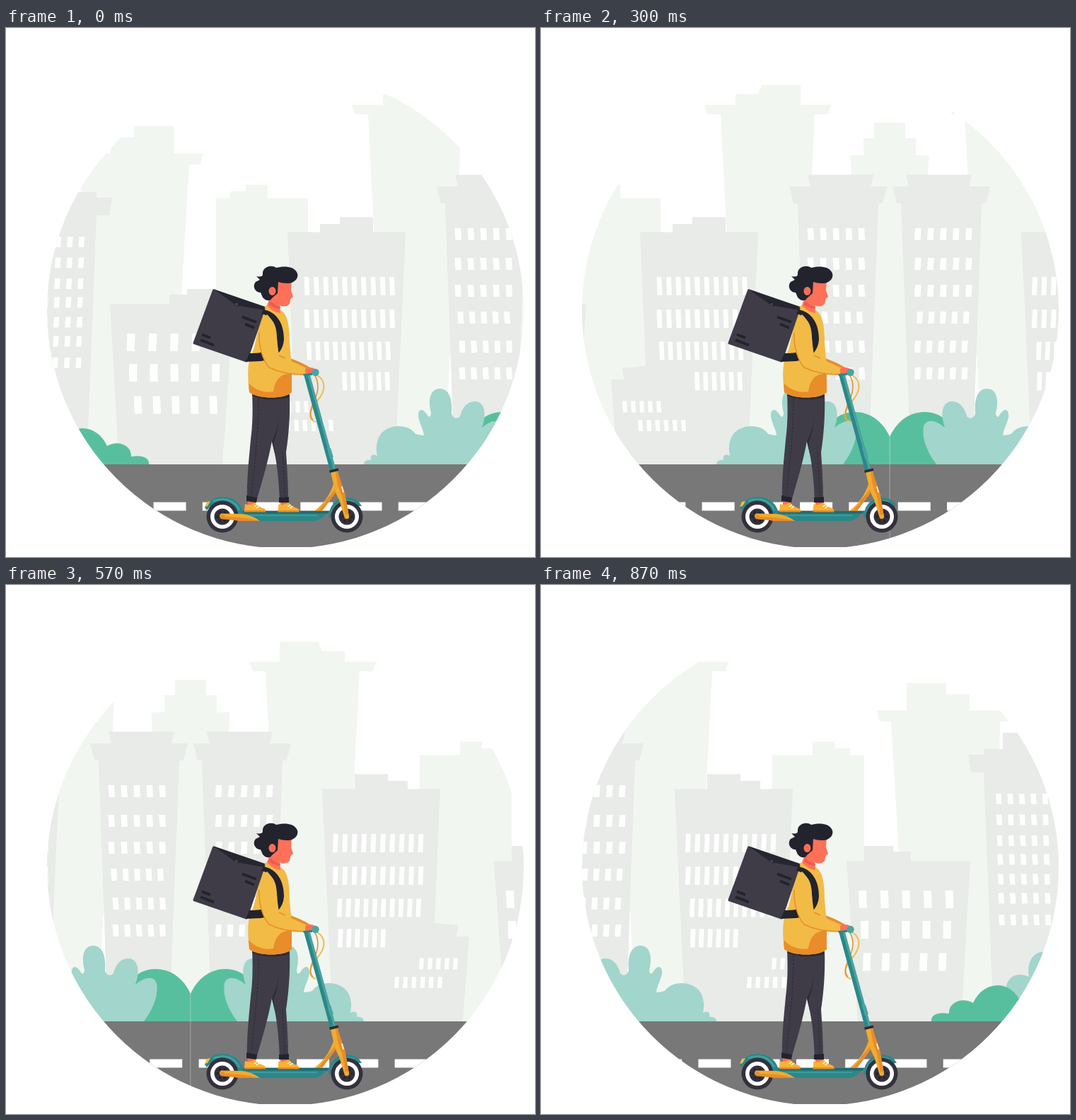
These frames come from a looping animation (748 by 748 pixels, 0.9 s). An HTML page:

```html
<!DOCTYPE html>
<html lang="en">
<head>
<meta charset="utf-8">
<title>Scooter courier</title>
<style>
  html, body { margin: 0; width: 100%; height: 100%; overflow: hidden; background: #fff; }
  svg { display: block; width: 100vw; height: 100vh; }
</style>
</head>
<body>
<svg viewBox="0 0 748 748">
  <defs>
    <clipPath id="disc"><circle cx="395" cy="399" r="337"/></clipPath>
    <g id="street">
      <g fill="#f1f6f1">
        <path d="M0 134H22V156H37.500L36.500 180H55.500L53 224V617H0Z"/>
        <path d="M126 80.500H181L186 93.500H218V108.500H262L258 122H239L214 617H131L106 122H88L83 108.500H126Z"/>
        <path d="M324 240.500H381V221.500H412V231H434V240.500H454V617H324Z"/>
        <path d="M472 177.500H514V138.500H570V154.500H603V177.500H666L662 193H646L640 617H517L492 193H476Z"/>
      </g>
      <g fill="#e8ebe8">
        <path d="M23 207.500H116L112 224H142L136 248H130L117 617H30L16 248H10L4 224H27Z"/>
        <path d="M186 288.500H232V267.500H279V277H307V288.500H353L345 478L378 481L376 497H394L385 617H201Z"/>
        <path d="M429 390.500H454V369H495V377H520V390.500H604L591 617H445Z"/>
        <path d="M601 240H623V232H650V209H748V617H637L623 265H605Z"/>
      </g>
      <path id="panes" fill="#fff"/>
      <g fill="#a2d5cb">
        <path d="M655 617V567C658 552 673 547 687 554C683 532 695 519 705 519C718 520 720 535 716 550L735 617Z"/>
        <path fill="#58bf9e" d="M549 617C548 609 556 603 574 606C573 590 593 582 608 591C616 574 629 566 643 566C657 566 668 575 676 590L690 617Z"/>
        <path fill="#58bf9e" d="M0 578C10 556 28 543 49 543C66 543 76 550 82 558V617H0Z"/>
        <path d="M66 617C53 600 46 582 47.500 566C49 552 64 553 78 565C71 546 74 528 88 528C99 528 106 537 109 549C113 554 119 552 121 545C119 522 126 510 138 510C151 510 155 526 150 544C150 550 153 552 156 546C163 536 169 539 168 550C166 560 161 567 160 576Q165 576 172 574C182 559 212 559 223 577C228 587 228 596 226 605C231 602 237 603 235 611C240 610 245 612 245 617Z"/>
      </g>
      <rect y="617" width="750" height="118" fill="#787878"/>
      <path id="dashes" fill="#fff"/>
    </g>
  </defs>

  <rect width="748" height="748" fill="#fff"/>
  <g clip-path="url(#disc)">
    <g id="world">
      <use href="#street"/>
      <use href="#street" transform="scale(-1 1)"/>
      <path d="M0 578V735" stroke="#fff" stroke-opacity=".28"/>
    </g>
  </g>
  <rect y="734" width="748" height="14" fill="#fff"/>

  <!-- scooter -->
  <g id="scooter">
    <path fill="none" stroke="#f2bb46" stroke-width="2" d="M440 491C453 499 452 513 441 526C428 541 426 553 438 557"/>
    <path fill="none" stroke="#e88d29" stroke-width="1.500" d="M437 492C444 504 441 516 436 527C430 539 429 549 434 554"/>
    <path fill="#2a8889" d="M421 490L429 488L466 623L458 625Z"/>
    <path fill="#4ba3a3" d="M426 489L429 488L466 623L463 624Z"/>
    <path fill="#4ba3a3" d="M454 594L459 594L463 607L458 609Z"/>
    <path fill="#2a8889" d="M329 683.500H456L449 691Q443 697 432 697H340Z"/>
    <path fill="#1f6c72" d="M328 683H457L455 686.500H329Z"/>
    <path fill="#4ba3a3" d="M345 688.500H440V689.700H345Z"/>
    <path fill="#2a8889" d="M281 678C286 667 297 663 306 663C322 663 333 672 336 686L328 691C325 679 317 671 306 671C296 671 290 674 284 682Z"/>
    <path fill="none" stroke="#4ba3a3" stroke-width="2" d="M293 669C310 662 324 669 330 682"/>
    <path fill="#f2bb46" d="M281 677L284 670L289 669L285 676Z"/>
    <path fill="#2a8889" d="M456 692C457 674 468 664 482 664C491 664 499 668 503 676L497 676C484 667 468 673 464 692Z"/>
    <path fill="none" stroke="#4ba3a3" stroke-width="1.500" d="M460 684C465 672 478 665 492 670"/>
    <g id="wheels"></g>
    <path fill="#f2ab2e" d="M304 686.500L332 687C344 688 352 692 359 697H333L304 694Q300 690 304 686.500Z"/>
    <path fill="#e88d29" d="M304 694Q302 691 306 691L330 692Q345 693 359 697H333Z"/>
    <path fill="#e88d29" d="M466 645L470 652L447 683H436C450 675 460 662 466 645Z"/>
    <path fill="#f2ab2e" d="M466 641L466 651L443 681L436 683C449 673 458 660 463 645Z"/>
    <path fill="#f2ab2e" d="M459 628L469 626C472 642 479 652 480 663L485 690Q484 696 479 693L471 667C464 655 463 643 459 628Z"/>
    <path fill="#e88d29" d="M466 627L469 626C472 642 479 652 480 663L485 690L481 694L475 662C469 650 468 640 466 627Z"/>
    <circle cx="482" cy="691" r="3" fill="#f2ab2e"/>
    <path stroke="#fff" stroke-width="1.500" stroke-linecap="round" d="M475 649L477 656"/>
    <path fill="#2b2a35" d="M457 625.500L469.500 622.500L470.500 626L458 629Z"/>
    <circle cx="306" cy="691" r="3" fill="#e88d29"/>
  </g>

  <!-- rider -->
  <g id="rider">
    <path fill="#ff7058" d="M342 667H353V675H342ZM388 667H399V675H388Z"/>
    <g id="shoe">
      <path fill="#f9b233" d="M338 673Q345 676 352 671Q357 677 364 679Q367 680 367 683H337Z"/>
      <path fill="#e88d29" d="M337 682H367V684.500H337Z"/>
      <path stroke="#fff" stroke-width="1.200" d="M351 677L355 674M354 679L358 676"/>
    </g>
    <use href="#shoe" x="47.500"/>
    <path fill="#3f3c48" d="M348 514L401 518C402 545 400 575 396 600C398 630 399 650 399 669L387 670C386 640 383 610 376 584C371 612 362 642 354 669L341 666C340 640 344 605 346 582C349 560 349 540 348 514Z"/>
    <path fill="#2b2a35" d="M349 514L400 518V522C380 528 360 525 348 520ZM389 527C386 545 388 560 376 585C378 593 380 601 381 606C379 592 378 586 379 584C387 565 386 545 389 527Z"/>
    <path fill="none" stroke="#2b2a35" stroke-dasharray="3 2" d="M357 524C358 560 352 610 347 660M391 600C392 620 394 645 394 662"/>
    <path fill="#24242e" d="M340 661L355 664L354 671L340 669ZM386 664L400 663V671H386Z"/>

    <path fill="#e88d29" d="M396 465Q415 471 430 480L426 486L398 476Z"/>
    <path fill="#f2bb46" d="M366 393C375 392 384 396 391 401C399 408 401 425 401 445L404 478V515C395 525 356 525 344 515C341 490 341 470 350 455C354 440 358 415 366 393Z"/>
    <path fill="#e88d29" d="M404 489C388 487 380 499 378 514C363 517 351 510 343 502L344 515C356 525 395 525 404 515Z"/>
    <path fill="#ff7058" d="M373 382L387 389L388 403C380 402 374 398 369 392Z"/>
    <path fill="#ed5d4b" d="M374 386Q381 393 388 394L387 397Q378 396 372 391Z"/>
    <path fill="#ff7058" d="M373 365L386 356H404L403 371L406 380L402.500 383L401 390Q397 395 389 393Q378 390 374 380Z"/>
    <path fill="#22232c" d="M359 356L354 351Q363 353 363 348C362 338 375 334 382 339C393 336 407 337 411 345C416 353 407 362 397 361Q390 361 385 359L384 375L376 382C374 387 367 386 363 381L360 374C352 374 348 365 353 359Z"/>
    <ellipse cx="376.500" cy="372" rx="5" ry="6" fill="#ff7058"/>
    <path fill="none" stroke="#ed5d4b" d="M374 370Q378 369 378 375"/>

    <path fill="#3f3c48" stroke="#3f3c48" stroke-width="3" stroke-linejoin="round" d="M293.500 371L365 397L340 471L266 445.500Z"/>
    <path fill="#262631" d="M293 369L366 394L365 399L331 393Q326 394 321 389Z"/>
    <circle cx="326" cy="390.500" r="1.800" fill="#4a4855"/>
    <path fill="none" stroke="#22232c" stroke-width="4" d="M334 408.500L354 416M338 418.500L351 424M277 433.500L289 438M275 441L294 448.500"/>
    <path fill="#22232c" d="M364 398C384 402 393 419 393 440C392 458 380 468 361 471L339 472L344 460C367 460 383 456 383 438C383 420 377 408 361 404Z"/>
    <path fill="#f2bb46" d="M369 405C378 413 383 428 384 448L386 463L425 481L422 490C402 490 384 486 372 480C363 470 357 450 358 431C360 419 364 411 369 405Z"/>
    <path fill="none" stroke="#e88d29" stroke-width="1.500" d="M358 431C357 450 363 470 372 480C384 486 402 490 422 490M386 463L395 467"/>
    <path fill="#ff7058" d="M423 482Q430 478 437 482L441 488Q435 492 423 489Z"/>
    <circle cx="437.500" cy="487" r="5.200" fill="#4ba3a3"/>
    <path fill="#2a8889" d="M420 489L433 488V491L421 492Z"/>
  </g>
</svg>
<script>
  const $ = id => document.getElementById(id);
  const STEP = 30, STEPS = 30, LOOP = STEP * STEPS;
  const START = 751, SHIFT = 748 / 29;

  // One row of windows: left, top, count, pitch, width, height, lean
  function row(x, y, n, pitch, w, h, lean) {
    let d = "";
    for (let i = 0; i < n; i++)
      d += `M${x + i * pitch} ${y}h${w}l${lean} ${h}h${-w}Z`;
    return d;
  }

  function panes() {
    let d = "";
    [283, 325, 363].forEach(y => d += row(36, y, 5, 18, 8.5, 17, -1));
    d += row(39, 401, 5, 16.4, 8, 17, -1);
    [442, 480].forEach(y => d += row(36, y, 5, 16.6, 8, 17, -1));
    [352, 398].forEach(y => d += row(202, y, 10, 13.4, 6.8, 26, -1));
    d += row(208, 443.5, 10, 12.4, 6.5, 26, -1);
    d += row(209, 486.5, 6, 12.1, 6.5, 26, -1);
    d += row(324, 527.5, 5, 12, 6, 16, -1);
    d += row(289, 554, 6, 12.2, 6, 16, -1);
    d += row(446, 432, 5, 30.6, 11, 25, 1);
    d += row(449, 475, 5, 29.2, 11, 25, 0);
    d += row(453, 520.5, 5, 26.7, 10.5, 25, -1);
    [295, 324.5, 354, 380.5, 408.5, 435.5, 466].forEach((y, i) =>
      d += row(640 + i * 0.7, y, 5, 16.4, 7.5, 15, 1));
    return d;
  }

  function wheel(x) {
    const y = 691;
    let s = [[22.5, "#34313d"], [17, "#fff"], [11.5, "#34313d"]].map(([r, c]) =>
      `<circle cx="${x}" cy="${y}" r="${r}" fill="${c}"/>`).join("");
    for (let i = 0; i < 6; i++) {
      const a = i * Math.PI / 3;
      s += `<circle cx="${x + 7 * Math.cos(a)}" cy="${y + 7 * Math.sin(a)}" r="1.8" fill="#22232c"/>`;
    }
    return s;
  }

  $("panes").setAttribute("d", panes());
  $("dashes").setAttribute("d", row(11.7, 670.5, 11, 69.25, 46, 12, 0));
  $("wheels").innerHTML = wheel(306) + wheel(482);

  // The street moves in 30 ms steps and jumps back when the loop restarts
  function draw(ms) {
    const i = Math.floor(((ms + 1) % LOOP) / STEP);
    $("world").setAttribute("transform", `translate(${START - i * SHIFT})`);
  }

  let t0;
  function tick(now) {
    t0 ??= now;
    draw(now - t0);
    requestAnimationFrame(tick);
  }
  draw(0);
  requestAnimationFrame(tick);
</script>
</body>
</html>
```
